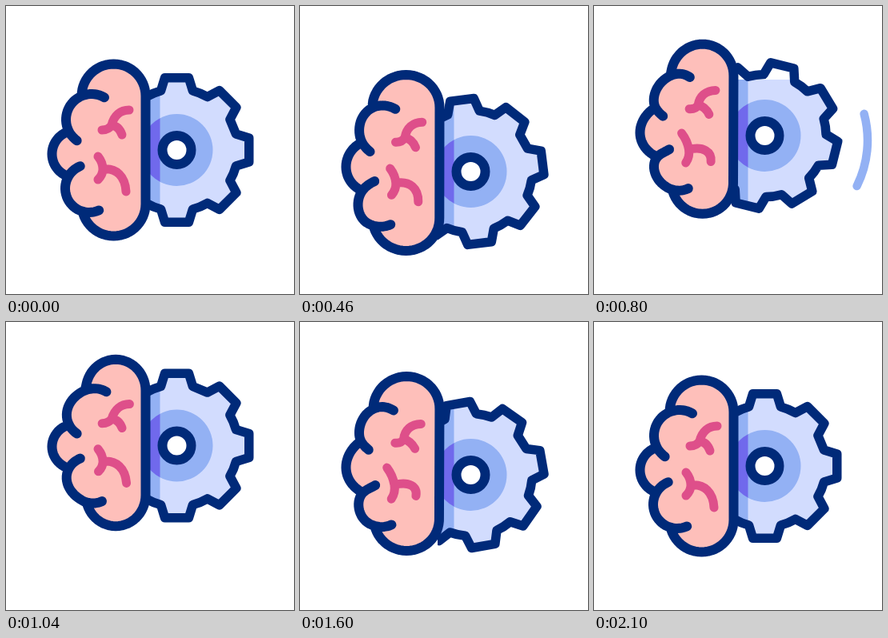
Write an HTML page that moves like this. It is 360 by 360 pixels and loops after 2400 ms.

```html
<!DOCTYPE html>
<html lang="en">
<head>
<meta charset="utf-8">
<title>Brain and gear</title>
<style>
  html, body { margin: 0; width: 100%; height: 100%; overflow: hidden; background: #fff; }
  svg { display: block; width: 100%; height: 100%; }
  path { stroke-linecap: round; stroke-linejoin: round; }
  .line { fill: none; stroke: #002a79; stroke-width: 11.5; }
  .crack { fill: none; stroke: #de4f8a; stroke-width: 11; }
  .skin { fill: #febfba; }
  .steel { fill: #d2dcfe; }
  .ring { fill: #93b1f4; }
  .ring-dark { fill: #7069ec; }
  .swoosh { fill: none; stroke: #93b1f4; stroke-width: 10.5; }
  #outline, .hub { stroke-width: 12; }
  .hub { fill: #fff; }
</style>
</head>
<body>
<svg viewBox="0 0 360 360">
  <defs>
    <clipPath id="right"><rect x="172" width="188" height="360"/></clipPath>
    <clipPath id="shape"><path class="gear"/></clipPath>
    <clipPath id="strip"><rect x="-45" y="-110" width="24" height="220"/></clipPath>
  </defs>
  <path id="swoosh" class="swoosh"/>
  <g clip-path="url(#right)">
    <g id="wheel">
      <g clip-path="url(#shape)">
        <rect class="steel plate" x="-50" width="160" height="220"/>
        <rect class="ring plate" x="-50" width="29" height="220"/>
        <circle class="ring" r="45"/>
        <circle class="ring-dark" r="45" clip-path="url(#strip)"/>
      </g>
      <path class="line gear"/>
      <circle class="line hub" r="18"/>
    </g>
  </g>
  <path id="fill" class="skin"/>
  <path id="cracks" class="crack"/>
  <path id="outline" class="line"/>
</svg>
<script>
const LOOP = 2400, STEP = 20;
const $ = id => document.getElementById(id);
const gears = document.querySelectorAll('.gear');
const plates = document.querySelectorAll('.plate');

const ramp = (t, a, b) => Math.min(Math.max((t - a) / (b - a), 0), 1);

function polar(cx, cy, r, deg) {
  const a = deg * Math.PI / 180;
  return `${(cx + r * Math.cos(a)).toFixed(2)},${(cy + r * Math.sin(a)).toFixed(2)}`;
}

// Polyline along a circle, so that it can be bent point by point
function arc(cx, cy, r, from, to) {
  const n = Math.ceil(Math.abs(to - from) / 6);
  return Array.from({ length: n + 1 }, (_, i) => polar(cx, cy, r, from + (to - from) * i / n)).join(' ');
}

// The brain is five lobes; their inner ends make the curls
const LOBES = [
  arc(134.5, 112.5, 40, 0, -180),
  arc(107, 142, 32, -60, -235),
  arc(87, 185, 29.5, -108, -252),
  arc(104, 228, 30, -112, -294),
  arc(134.5, 247.5, 40, -198, -360)
];
const FILL = `M${LOBES.join(' ')}Z`;
const OUTLINE = LOBES.map(l => 'M' + l).join('') + ' 174.5,112.5';
const CRACKS = 'M154,130 C143,130 135,137 132,149 M120,155 C126,155 130,152 132,149 C139,150 143,155 145,161 ' +
  'M115,188 C119,193 121,198 121,204 C121,210 118,214 115,217 M121,204 C138,202 149,213 150,232';

// Where the bend pulls: x, y, dx, dy
const PULLS = [
  [121, 116, -5, 0], [88, 163, -3, -6], [92, 200, 3, 7],
  [115, 188, -7, -5], [115, 217, 0, 7], [150, 232, -5, -13], [145, 140, -4, 2]
];

// Tracks: time and value at the turning points and on the way between them
const LIFT = [[220, 0], [370, 24], [460, 16], [740, -22], [900, -29], [1040, -29],
  [1360, 12], [1440, 24], [1600, -3], [1700, -15], [2100, 0]];
const DROP = [[220, 0], [420, 29], [800, -18], [920, -27], [1040, -25.5],
  [1360, 4], [1480, 24], [1600, 11], [1740, -12], [2100, 0]];
const TURN = [[220, 0], [380, -12], [460, -7], [800, 194], [1040, 315],
  [1360, 367.5], [1600, 350], [2100, 360]];

// Smooth curve through a track, at rest at both ends
function follow(track, t) {
  const last = track.length - 1;
  t = Math.min(Math.max(t, track[0][0]), track[last][0]);
  const i = Math.max(track.findIndex(k => k[0] >= t) - 1, 0);
  const slope = j => j > 0 && j < last
    ? (track[j + 1][1] - track[j - 1][1]) / (track[j + 1][0] - track[j - 1][0]) : 0;
  const [t0, a] = track[i], [t1, b] = track[i + 1];
  const d = t1 - t0, u = (t - t0) / d, v = 1 - u;
  return v * v * (1 + 2 * u) * a + u * u * (3 - 2 * u) * b +
    d * u * v * (v * slope(i) - u * slope(i + 1));
}

const swell = (t, from, to) => Math.sin(Math.PI * ramp(t, from, to) ** 1.3) ** 2;

function bender(lift, bend) {
  const stretch = .12 * lift + 2 * bend;
  const move = (_, sx, sy) => {
    const x = +sx, y = +sy, h = y - 180;
    const edge = Math.min(1, Math.abs(h / 73) ** 3);
    let nx = x - 1.5 * stretch * edge * (174.5 - x) / 80;
    let ny = y + lift + stretch * h / 113;
    for (const [px, py, dx, dy] of PULLS) {
      const w = bend * Math.exp(-((x - px) ** 2 + (y - py) ** 2) / 392);
      nx += dx * w;
      ny += dy * w;
    }
    return nx.toFixed(2) + ',' + ny.toFixed(2);
  };
  return path => path.replace(/([\d.]+),([\d.]+)/g, move);
}

function gearPath() {
  let d = '';
  for (let a = 0; a < 360; a += 45) {
    const [base, tip] = [15.1, 9.4];
    d += (a ? 'A76.6 76.6 0 0 1 ' : 'M') + polar(0, 0, 76.6, a - base) +
      [[91.5, -tip], [91.5, tip], [76.6, base]].map(([r, o]) => 'L' + polar(0, 0, r, a + o)).join('');
  }
  return d + 'Z';
}
gears.forEach(g => g.setAttribute('d', gearPath()));

function drawSwoosh(t) {
  const tail = -45 + 75 * ramp(t, 700, 950), head = -45 + 75 * ramp(t, 640, 808);
  const end = deg => polar(214, 168, 128, deg);
  $('swoosh').setAttribute('d', head > tail ? `M${end(tail)}A128 128 0 0 1 ${end(head)}` : '');
}

function draw(t) {
  const bend = swell(t, 220, 1040) + swell(t, 1040, 2100);
  const warp = bender(follow(LIFT, t), bend);
  $('fill').setAttribute('d', warp(FILL));
  $('outline').setAttribute('d', warp(OUTLINE));
  $('cracks').setAttribute('d', warp(CRACKS));

  $('wheel').setAttribute('transform', `translate(213.5 ${180 + follow(DROP, t)})`);
  const angle = follow(TURN, t);
  gears.forEach(g => g.setAttribute('transform', `rotate(${angle})`));
  // The plate trails the rim for a moment on the way up
  const top = -100 + 30 * Math.max(0, 1 - Math.abs(t - 800) / 60);
  plates.forEach(p => p.setAttribute('y', top));
  drawSwoosh(t);
}

function tick() {
  draw(Math.floor(performance.now() % LOOP / STEP) * STEP);
  requestAnimationFrame(tick);
}
tick();
</script>
</body>
</html>
```
